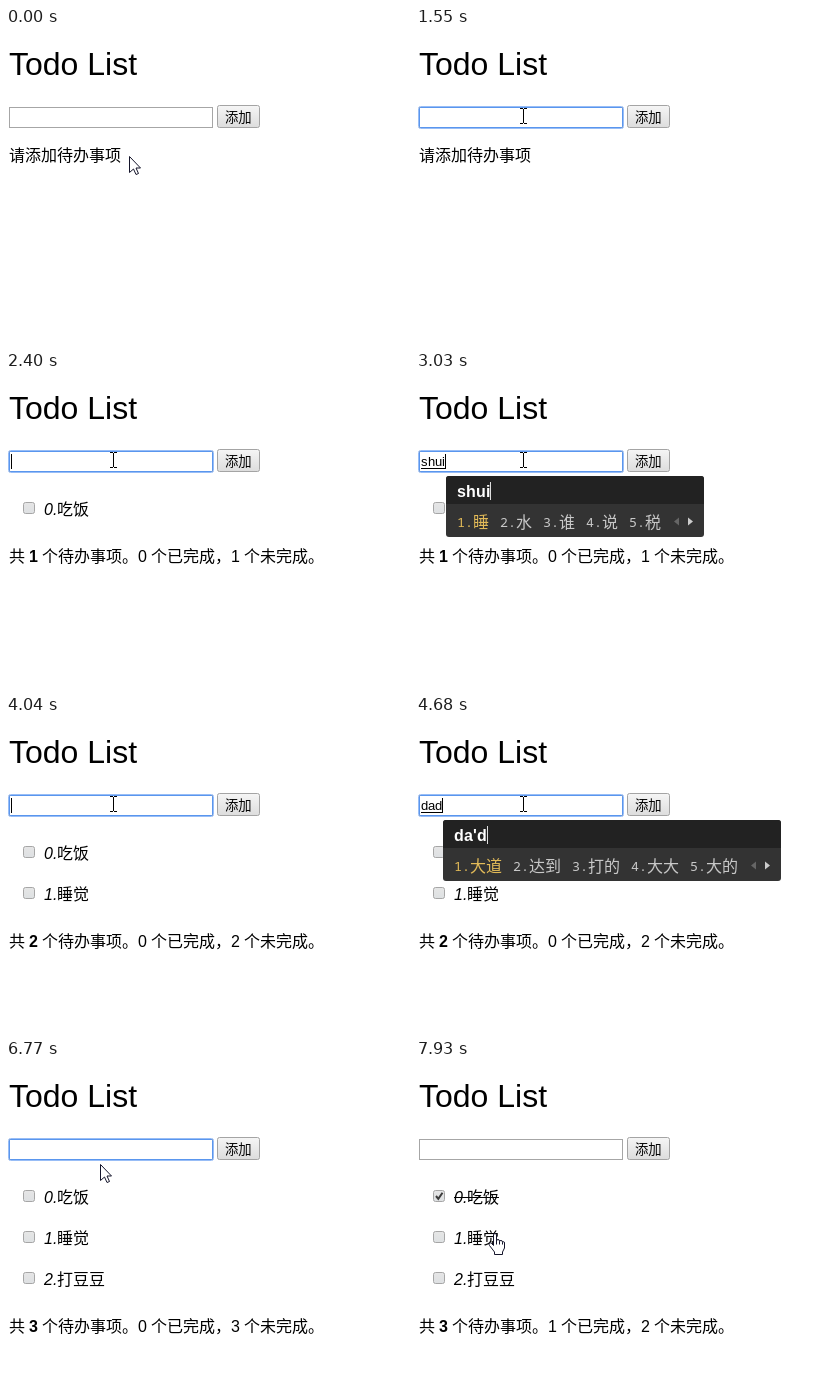
These frames come from a looping animation (404x316 px, 8 s). An HTML page with a canvas:

```html
<!DOCTYPE html>
<html lang="zh-CN">
<head>
<meta charset="utf-8">
<title>Todo List</title>
<style>
html, body { margin: 0; height: 100%; overflow: hidden; background: #fff; }
canvas { display: block; }
</style>
</head>
<body>
<canvas width="404" height="316"></canvas>
<script>
const ctx = document.querySelector('canvas').getContext('2d');
const LOOP = 8000;
const SANS = '"Liberation Sans", "Noto Sans CJK SC", sans-serif';
const CJK = '"Noto Sans CJK SC", sans-serif';
const MONO = '"Noto Sans Mono", monospace';

// [time, typed text, candidates, minimum panel width]; "*" is the rice bowl
const typing = [
  [0, ''],
  [1700, 'c', '才 吃 从 出 次'],
  [1780, 'ch', '出 吃 车 成 长'],
  [1860, 'chi', '吃 迟 尺 持 池'],
  [1950, "chi'f", '吃饭 吃 迟 尺 持'],
  [2030, "chi'fan", '吃饭 吃 迟 尺 *', 372],
  [2100, '吃饭'],
  [2400, ''],
  [2800, 's', '是 说 上 所 时'],
  [2880, 'sh', '是 时候 什么 事情 说'],
  [2950, 'shu', '书 树 数 属 输'],
  [3030, 'shui', '睡 水 谁 说 税'],
  [3200, "shui'j", '睡觉 水 睡 谁 税'],
  [3270, "shui'ji", '水际 水 睡 谁 税'],
  [3350, "shui'jia", '水价 睡 水 谁 税'],
  [3420, "shui'jiao", '睡觉 水饺 水胶 睡 水', 346],
  [3570, '睡觉'],
  [4040, ''],
  [4440, 'd', '的 大 到 都 对于'],
  [4510, 'da', '大 打 达 答 搭'],
  [4680, "da'd", '大道 达到 打的 大大 大的'],
  [4760, "da'do", '大都 大豆 打斗 大多 打动'],
  [4840, "da'dou", '大豆 打斗 大都 大斗 打豆'],
  [5060, "da'dou'd", '大豆的 打斗的 大豆 打斗 大都'],
  [5130, "da'dou'do", '打豆豆 大豆 打斗 大都 大斗'],
  [5210, "da'dou'dou", '打豆豆 大豆 打斗 大都 大斗'],
  [5440, '打豆豆'],
  [5760, '']
];
const tasks = [[2400, '吃饭'], [4040, '睡觉'], [5760, '打豆豆']];
const FOCUS = 1000, CLICK = 7300;
const caretOff = [[1550, 1700], [6320, 6850]];

const pointer = [
  [0, 'arrow', 123, 128], [700, 'arrow', 114, 110], [780, 'beam', 104, 80],
  [6690, 'beam', 101, 84], [6770, 'arrow', 94, 104], [6850, 'arrow', 86, 117],
  [6920, 'hand', 72, 137], [7000, 'hand', 69, 142], [7470, 'hand', 73, 160],
  [7550, 'hand', 75, 168], [7700, 'hand', 75, 169], [7850, 'hand', 73, 172],
  [7930, 'hand', 72, 173]
];
const shapes = {
  arrow: new Path2D('M.5.5V16.5L4.5 13 7 18.5 9.5 17.5 7 12H11.5Z'),
  beam: new Path2D('M0 .5H3M4 .5H7M3.5 1V15M0 15.5H3M4 15.5H7'),
  hand: new Path2D('M5.5 12.5V2a1.5 1.5 0 0 1 3 0V8q0-1.5 1.5-1.5T11.5 8v.5q0-1 1.5-1t1.5 1.5v.5' +
    'q0-.8 1-.8t1 1.3V15l-2 4v2.5H6.5V19l-5-6.5q-1-1.5 0-2.3t2 .3zM8.5 8v3.5M11.5 8.5v3M14.5 9.5v2')
};

const latest = (list, t) => list.findLast(e => e[0] <= t);

function rect(x, y, w, h, color) {
  ctx.fillStyle = color;
  ctx.fillRect(x, y, w, h);
}

function round(x, y, w, h, r, fill, stroke) {
  ctx.beginPath();
  ctx.roundRect(x, y, w, h, r);
  if (fill) { ctx.fillStyle = fill; ctx.fill(); }
  if (stroke) { ctx.strokeStyle = stroke; ctx.lineWidth = 1; ctx.stroke(); }
}

function line(points, color, width = 1) {
  ctx.beginPath();
  points.forEach(p => ctx.lineTo(...p));
  ctx.strokeStyle = color;
  ctx.lineWidth = width;
  ctx.stroke();
}

// Draws text with whole-pixel advances and returns the x where it ends
function text(s, x, y, font = '300 16px ' + SANS, color = '#000') {
  ctx.font = font;
  ctx.fillStyle = color;
  for (const run of String(s).match(/[ -~]|[^ -~]+/g) || []) {
    ctx.fillText(run, x, y);
    x += Math.round(ctx.measureText(run).width);
  }
  return x;
}

function shade(y, h, top, bottom) {
  const g = ctx.createLinearGradient(0, y, 0, y + h);
  g.addColorStop(0, top);
  g.addColorStop(1, bottom);
  return g;
}

function triangle(x, y, dir, color) {
  ctx.beginPath();
  ctx.moveTo(x, y - 4);
  ctx.lineTo(x, y + 4);
  ctx.lineTo(x + 5 * dir, y);
  ctx.fillStyle = color;
  ctx.fill();
}

function bowl(x, y) {
  ctx.beginPath();
  ctx.ellipse(x, y - 3, 9, 7, 0, Math.PI, 0);
  ctx.fillStyle = '#f4f4f2';
  ctx.fill();
  ctx.beginPath();
  ctx.ellipse(x, y - 2, 11, 11, 0, 0, Math.PI);
  ctx.fillStyle = shade(y - 2, 11, '#e4e4e2', '#a8a8a6');
  ctx.fill();
  ctx.beginPath();
  ctx.ellipse(x, y - 2, 11, 3, 0, 0, 7);
  ctx.fillStyle = '#fafaf8';
  ctx.fill();
}

function panel(x, pinyin, candidates, minWidth = 0) {
  const items = candidates.split(' ');
  const widths = items.map(s => s === '*' ? 34 : 16 * s.length);
  const inner = widths.reduce((sum, w) => sum + w + 27, -11);
  const tall = items.includes('*');
  const mid = tall ? 150 : 149.5;
  const base = tall ? 157 : 156;
  const width = Math.max(inner + 54, minWidth);
  round(x, 104, width, tall ? 63 : 61, 3, '#333');
  round(x, 104, width, 28, [3, 3, 0, 0], '#222');
  const end = text(pinyin, x + 11, 125, 'bold 16px ' + SANS, '#fff');
  rect(end, 110, 1, 18, '#ddd');
  let cx = x + 11;
  items.forEach((s, i) => {
    const color = i ? '#c8c8c8' : '#e3bb58';
    text(i + 1 + '.', cx, base - 1, '13.33px ' + MONO, color);
    if (s === '*') bowl(cx + 28, mid);
    else text(s, cx + 16, base, '300 16px ' + CJK, color);
    cx += widths[i] + 27;
  });
  triangle(cx + 7, mid, -1, '#666');
  triangle(cx + 16, mid, 1, '#ccc');
  if (tall) {
    ctx.beginPath();
    ctx.arc(394.5, 119.5, 5, 0, 7);
    ctx.strokeStyle = '#888';
    ctx.lineWidth = 1;
    ctx.stroke();
    rect(392, 119, 5, 1, '#888');
    rect(394, 117, 1, 5, '#888');
  }
}

function todoList(t) {
  const shown = tasks.filter(e => e[0] <= t);
  const done = t >= CLICK ? 1 : 0;
  if (!shown.length) return text('请添加待办事项', 3, 133);
  shown.forEach(([, name], i) => {
    const y = 130 + 41 * i;
    round(17.5, y + .5, 11, 11, 2, shade(y, 12, '#e6e6e6', '#dde0e2'), '#a6a6a6');
    const end = text(name, text(i + '.', 38, y + 13, 'italic 16px ' + SANS), y + 13);
    if (i < done) {
      line([[20, y + 6], [22.3, y + 8.8], [26.5, y + 2.8]], '#3c3c3c', 2);
      rect(38, y + 7, end - 38, 1, '#000');
    }
  });
  const n = shown.length, y = 149 + 41 * n;
  let x = text('共 ', 3, y);
  x = text(n, x, y, 'bold 16px ' + SANS);
  text(` 个待办事项。${done} 个已完成\uff0c${n - done} 个未完成。`, x, y);
}

function input(t) {
  const [, typed, candidates, minWidth] = latest(typing, t);
  const focused = t >= FOCUS && t < CLICK;
  ctx.strokeStyle = '#a6a6a6';
  ctx.lineWidth = 1;
  ctx.strokeRect(3.5, 79.5, 203, 20);
  if (focused) {
    ctx.globalAlpha = t < FOCUS + 120 ? .5 : 1;
    round(2.5, 78.5, 205, 22, 2, '', '#98bdf6');
    round(3.5, 79.5, 203, 20, 1, '', '#5a96ee');
    ctx.globalAlpha = 1;
  }
  const end = candidates
    ? text(typed.replaceAll("'", ''), 5, 94, '13px ' + SANS)
    : text(typed, 5, 95, '300 13.33px ' + CJK);
  if (candidates) rect(5, 96, end - 5, 1, '#000');
  if (focused && !caretOff.some(([a, b]) => t >= a && t < b)) rect(end, 82, 1, 15, '#000');
  return () => candidates && panel(end + 1, typed, candidates, minWidth);
}

function cursor(t) {
  const [, kind, x, y] = latest(pointer, t);
  ctx.save();
  ctx.translate(x, y);
  ctx.fillStyle = '#fff';
  ctx.strokeStyle = kind === 'beam' ? '#000' : '#14142a';
  ctx.lineWidth = 1;
  if (kind !== 'beam') ctx.fill(shapes[kind]);
  ctx.stroke(shapes[kind]);
  ctx.restore();
}

function draw(t) {
  rect(0, 0, 404, 316, '#fff');
  ctx.font = '32px ' + SANS;
  ctx.fillStyle = '#000';
  ctx.fillText('Todo List', 3, 47);
  const drawPanel = input(t);
  round(211.5, 77.5, 42, 22, 2, shade(77, 23, '#f6f6f6', '#dcdcdc'), '#a4a4a4');
  text('添加', 219, 94, '300 13.33px ' + CJK);
  todoList(t);
  drawPanel();
  cursor(t);
}

const start = performance.now();
(function frame() {
  draw((performance.now() - start) % LOOP);
  requestAnimationFrame(frame);
})();
</script>
</body>
</html>
```
